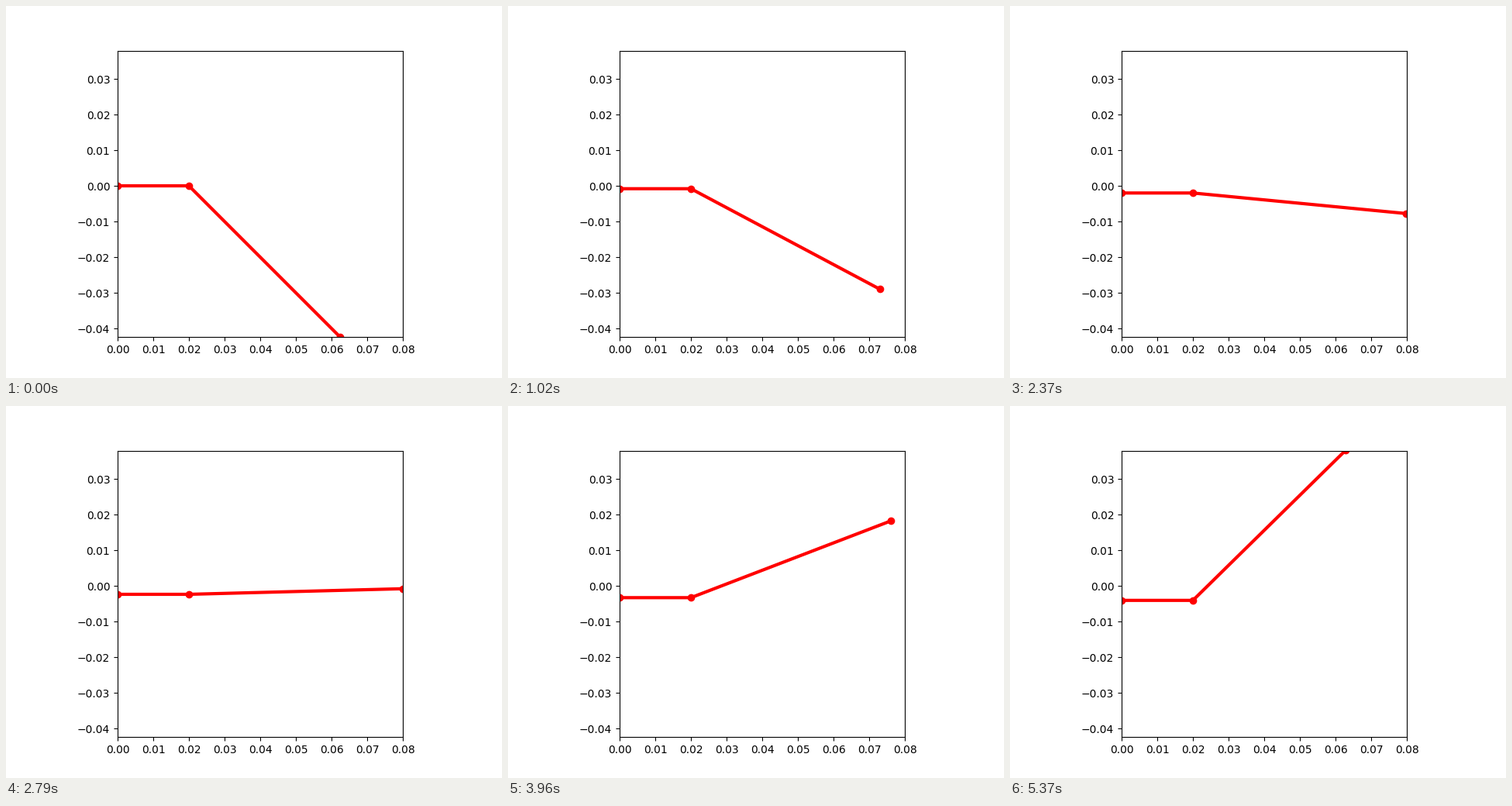
A matplotlib script that plays this animation: 640 by 480 pixels, repeating every 5400 ms.

```python
import matplotlib.pyplot as plt
import numpy as np
from matplotlib.animation import FuncAnimation

FRAMES = 180
INTERVAL = 30
ROOT = 0.02       # length of the level link
ARM = 0.06        # length of the swinging link
SCALE = 4600      # pixels per unit
Y_MIN = -ARM * np.sin(np.pi / 4)

fig = plt.figure(figsize=(6.4, 4.8), dpi=100)
ax = fig.add_subplot(aspect="equal")
ax.set_xlim(0, 0.08)
ax.set_ylim(Y_MIN, Y_MIN + 369.6 / SCALE)
linkage, = ax.plot([], [], "o-", color="red", lw=3)


def drop(n):
    """Sinking of the base: it gains speed, then slows down."""
    return n * (0.098 + 4.0e-4 * n - 2.02e-6 * n**2) / SCALE


def update(n):
    angle = np.radians(-45 + 0.5 * n)
    base = -drop(n)
    linkage.set_data(
        [0, ROOT, ROOT + ARM * np.cos(angle)],
        [base, base, base + ARM * np.sin(angle)],
    )
    return linkage,


anim = FuncAnimation(fig, update, frames=FRAMES, interval=INTERVAL,
                     repeat=True, repeat_delay=0)
plt.show()
```
